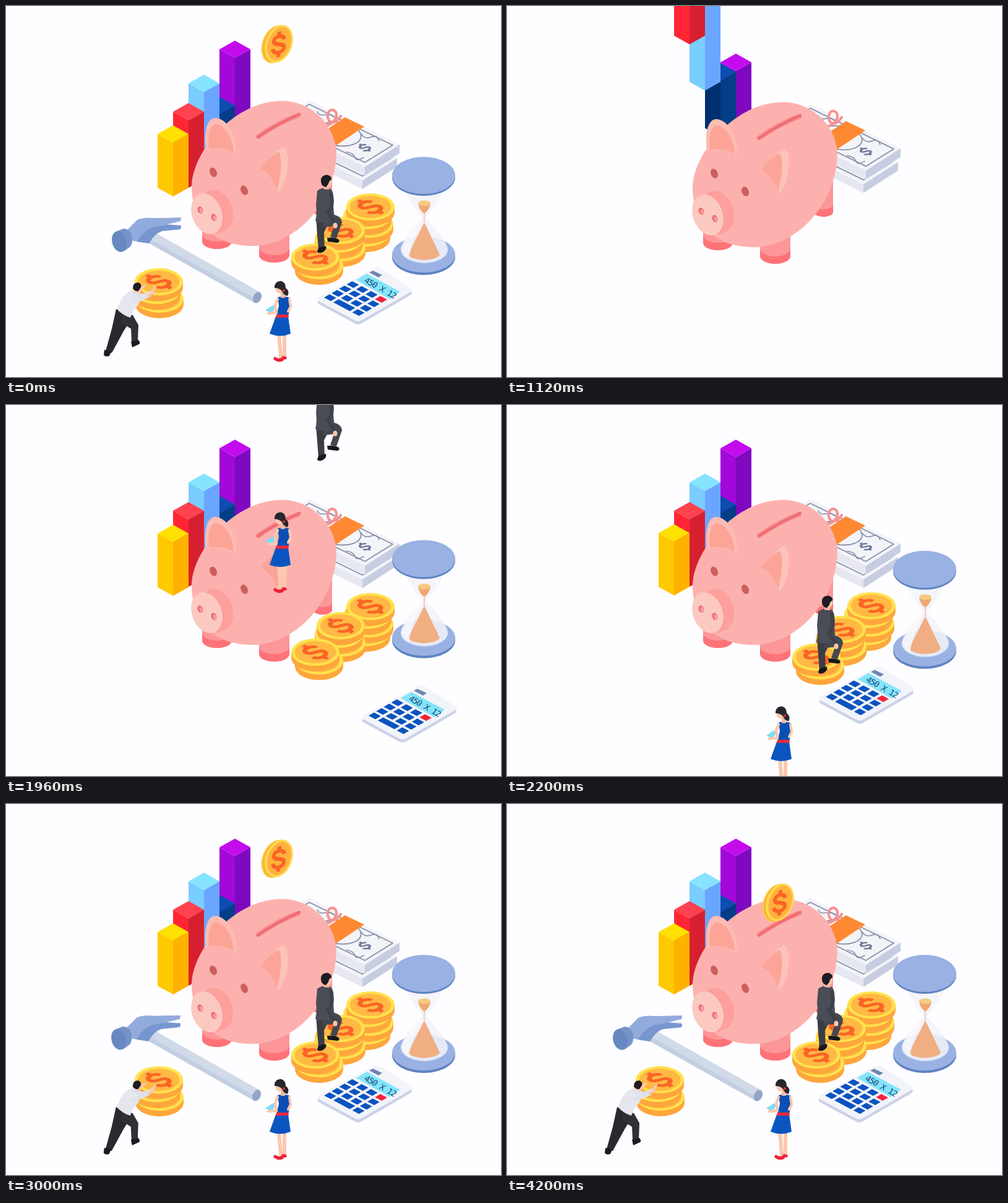
Animation of 800 by 600 pixels, one loop 4.68 s. Source, as an HTML page:

```html
<!DOCTYPE html>
<html lang="en">
<head>
<meta charset="utf-8">
<title>Savings</title>
<style>
html, body { margin: 0; width: 100%; height: 100%; overflow: hidden; background: #fefdff }
svg { display: block; width: 100%; height: 100% }
</style>
</head>
<body>
<svg id="stage" viewBox="0 0 800 600"></svg>
<script>
const LOOP = 4680, START = 720;

// ---- shape helpers
const path = (d, fill, extra = '') => `<path d="${d}" fill="${fill}" ${extra}/>`;
const line = (d, color, width, cap = 'round') =>
  path(d, 'none', `stroke="${color}" stroke-width="${width}" stroke-linecap="${cap}" stroke-linejoin="round"`);
const poly = (points, fill) => `<polygon points="${points}" fill="${fill}"/>`;
const oval = (x, y, rx, ry, fill, turn = 0, extra = '') =>
  `<ellipse cx="${x}" cy="${y}" rx="${rx}" ry="${ry}" fill="${fill}" transform="rotate(${turn} ${x} ${y})" ${extra}/>`;

const dollar = (matrix, color, width) => `<g transform="matrix(${matrix})">` +
  line('M7 -5C6 -13 -8 -13 -7 -5C-6 1 7 -1 7 5.5C7 13 -7 13 -8 4.5M0 -17V-10M0 10V17', color, width, 'butt') + '</g>';

function bar(x, top, bottom, cap, left, right) {
  const m = x + 25, r = x + 50;
  return poly(`${x},${top + 14} ${m},${top + 28} ${m},${bottom} ${x},${bottom - 14}`, left) +
    poly(`${r},${top + 14} ${m},${top + 28} ${m},${bottom} ${r},${bottom - 14}`, right) +
    poly(`${x},${top + 14} ${m},${top} ${r},${top + 14} ${m},${top + 28}`, cap);
}

// Coins are listed by centre x, from the bottom up; y is the centre of the top face.
function stack(xs, y) {
  const coins = xs.map((x, i) => {
    const cy = y + (xs.length - 1 - i) * 14;
    return path(`M${x - 39} ${cy}v9a39 22 0 0 0 78 0v-9z`, '#fea63c') +
      oval(x, cy, 39, 22, '#ffe24c') + oval(x, cy, 33.5, 18, '#ffb944');
  });
  return coins.join('') + dollar(`1.15 -.64 1.15 .64 ${xs.at(-1)} ${y}`, '#fb6425', 4.8);
}

function leg(x, w, top, bottom) {
  const r = w / 2, ry = r * .5;
  const tube = (y, fill) => path(`M${x} ${y}V${bottom - ry}a${r} ${ry} 0 0 0 ${w} 0V${y}a${r} ${ry} 0 0 1 ${-w} 0z`, fill);
  return path(`M${x} ${top}h${w}V${bottom - ry}a${r} ${ry} 0 0 1 ${-w} 0z`, '#fc9698') +
    tube(bottom - ry - 12, '#fd7378');
}

// ---- objects
const pig = () =>
  line('M517 193C533 191 540 171 528 168C518 167 517 185 526 188C533 189 537 184 541 178', '#f98f90', 4) +
  leg(496, 31, 270, 339) + leg(317, 48, 345, 393) + leg(409, 49, 350, 415) +
  path('M300 290C301 240 364 154 446 153.5C490 153.5 530 188 534 235C534 315 470 388 398 388C335 388 300 350 300 290Z', '#fdb1ae') +
  line('M408 211Q440 188 472 177', '#fa8f90', 8) + line('M407 212Q440 190 474 175', '#ee6e74', 4.5) +
  path('M323 233C319 204 325 181 338 181C357 181 376 212 371 242C356 229 338 229 323 233Z', '#fcbcb3') +
  path('M328 231C325 206 331 190 340 191C356 194 368 216 368 238C355 229 340 229 328 231Z', '#fca597') +
  path('M411 263C425 245 440 232 446 229C455 228 457 245 455 262C453 282 446 296 440 301C437 285 425 270 411 263Z', '#fcc3b8') +
  path('M411 263C425 245 436 237 441 236C448 250 443 280 438 297C434 283 425 270 411 263Z', '#fca497') +
  oval(335, 269, 5.5, 8, '#cb5f5c', -25) + oval(385, 298, 5.5, 8, '#cb5f5c', -25) +
  oval(341, 331, 25, 34.5, '#fd9f9c', -20) + poly('315,305 331,299 358,361 340,369', '#fd9f9c') +
  oval(324.5, 336, 24, 34, '#fcc9c1', -20) +
  oval(314, 330, 4.2, 6, '#e9696b', -20) + oval(336, 342, 4.2, 6, '#e9696b', -20) +
  oval(315.3, 331, 2.6, 4.5, '#f99a98', -20) + oval(337.3, 343, 2.6, 4.5, '#f99a98', -20);

function bundle(dx, dy) {
  return `<g transform="translate(${dx} ${dy})">` +
    poly('434,188 580,260 580,274 434,202', '#e6e7f1') +
    poly('636,224 580,260 580,274 636,238', '#c7cde1') +
    poly('490,152 636,224 580,260 434,188', '#f3f4f8') +
    line('M490 159L625 225L580 253L445 187Z', '#8790aa', 1.8) + '</g>';
}
const money = () => bundle(-4, 22) + bundle(0, 0) +
  oval(538, 207, 36, 19, 'none', 8, 'stroke="#8790aa" stroke-width="1.8"') +
  line('M503 171Q506 178 515 176T529 179M574 207Q580 216 590 212T603 218M550 236Q562 238 564 245T578 245', '#8790aa', 1.6) +
  poly('548,180 579,195 522,233 492,217', '#ff8933') +
  dollar('.62 -.34 .5 .34 580 229', '#6f7a9a', 5);

const glass = () =>
  path('M624 402v4a51 29 0 0 0 102 0v-4z', '#5f83c2') + oval(675, 402, 51, 29, '#9ab2e3') +
  oval(676, 394, 38, 22, '#c9d5ef') +
  path('M638 394C640 376 664 354 673 344C668 333 652 325 648 302H704C700 325 684 333 679 344C688 354 712 376 714 394A38 21 0 0 1 638 394Z', '#f1f2f8', 'opacity=".75"') +
  path('M650 402L674 354Q676 350 678 354L701 402A26 11 0 0 1 650 402Z', '#f0ae82') +
  path('M666 320Q668 330 676 336Q684 330 686 320Z', '#f0a873') + oval(676, 319, 10, 4.5, '#f4cb80') +
  line('M676 334V352', '#f0ae82', 1) +
  path('M640 393C643 376 662 358 671 347C662 366 654 385 652 409Q643 405 640 393Z', '#fff', 'opacity=".55"') +
  line('M652 309Q657 327 671 340M699 309Q694 327 681 340', '#fff', 1.4) +
  path('M624 273v4a51 30 0 0 0 102 0v-4z', '#5f83c2') + oval(675, 274, 51, 30, '#99b1e3');

function calculator() {
  const spot = (i, j) => [560.5 + 15.2 * i - 12.2 * j, 450.5 + 8 * i + 7.1 * j];
  const key = (i, j, a, fill) =>
    poly([[-a, -.36], [a, -.36], [a, .36], [-a, .36]].map(([u, v]) => spot(i + u, j + v)).join(' '), fill);
  let keys = '';
  for (let i = 0; i < 4; i++) for (let j = 0; j < 4; j++) {
    const wide = j == 3 && i == 1;
    if (j == 3 && i == 2) continue;
    keys += key(wide ? 1.5 : i, j, wide ? .88 : .36, i == 3 && j == 0 ? '#f5243a' : '#0b53c0');
  }
  const shell = 'M507 470L595 424Q600 421 606 425L653 455Q659 459 653 463L575 508Q569 512 563 508L507 478Q500 474 507 470Z';
  return path(shell, '#cbd2e5', 'transform="translate(0 5)"') + path(shell, '#f2f4fa') +
    poly('587,431 593,428 608,435 602,439', '#6d87b0') +
    poly('566,443 583,433 637,462 620,474', '#83e5fa') +
    `<text transform="matrix(.86 .48 -.55 .76 577.5 446)" font-family="'DejaVu Sans Mono', monospace" font-size="14" letter-spacing="-1.3" fill="#1c4379">450 X 12</text>` + keys;
}

const hammer = () =>
  poly('240,366 411,463 402,480 230,383', '#d1dae8') + poly('230,383 234,377 405,474 402,480', '#c3cfe0') +
  oval(406, 471.5, 6.5, 9.5, '#93a6c8', 25) +
  path('M196 362L212 346Q222 341 240 343L283 342L282 348L261 353L283 355L282 361L252 364Q240 368 231 384L212 381L202 379Z', '#92abdd') +
  path('M231 384Q240 368 252 364L282 361L283 355L261 354L240 357Q222 362 212 381Z', '#7796cf') +
  path('M177 365L190 360Q202 361 204 374Q205 385 200 390L190 397Z', '#7593c9') +
  oval(183, 381, 11.5, 17, '#6788c0', -15);

const climber = () =>
  path('M501 342L526 342L514 366L515 394L505 394Z', '#3b3d45') +
  path('M512 336Q542 335 543 350L534 376L524 374L530 356L512 358Z', '#454750') +
  path('M519 375Q528 374 537 377Q541 382 535 383L520 381ZM505 391L517 388Q519 394 512 398Q504 401 503 397Z', '#17171c') +
  path('M503 299Q513 291 525 296Q531 302 529 323L531 346Q520 354 500 348Q503 335 501 322Z', '#4a4c56') +
  line('M525 303Q530 327 520 333L531 350', '#3f414a', 6) + oval(532, 355, 3.5, 4.5, '#f9c6ad') +
  path('M513 286L523 287L522 297L513 296Z', '#f4b99d') + oval(519.5, 285, 6.5, 8, '#f9c6ad') +
  path('M509 284Q508 274 519 273Q527 275 526 281Q522 282 521 288L517 293Q510 292 509 284Z', '#1d1c22');

const reader = () =>
  line('M441 530L444 567M450 530L450 565', '#fbc8ae', 6) +
  path('M434 567Q443 573 447 567L449 573Q441 579 432 571ZM446 566L453 567L454 571L447 572Z', '#ee2238') +
  path('M436 502H456L460 530Q443 537 426 530Z', '#0b55c0') +
  path('M439 471Q449 468 459 472L460 486L456 502H437L441 485Z', '#0a4fb4') + poly('437,499 456,499 457,504 436,504', '#f0283c') +
  poly('419,492 431,484 436,487 429,497', '#7fdcf4') +
  line('M439 474L435 484L437 496L424 497', '#fbc8ae', 4.5) + line('M458 474L460 486L456 494', '#fbc8ae', 4) +
  path('M444 463H451V472H444Z', '#f3b89d') + oval(442, 457, 6.5, 8, '#fbc8ae') +
  path('M434 453Q436 444 445 445Q452 447 452 456Q459 461 455 469Q449 468 446 461Q442 456 434 456Z', '#28262d') +
  oval(449, 460, 2, 2, '#e62e40');

const pusher = () =>
  path('M178 490L205 502L190 526L171 561L161 558L171 522Z', '#29292f') +
  path('M188 497L205 500L214 516L213 543L203 543L202 522L186 512Z', '#303037') +
  path('M159 556L170 559L167 566Q160 568 158 564ZM202 543L214 540Q218 545 215 547L204 552Z', '#1b1b20') +
  path('M184 479Q194 459 209 459L219 465Q217 484 206 491L201 504Q188 500 179 490Z', '#e5e6ee') +
  line('M207 464Q217 473 236 463M206 478Q219 474 231 468', '#e0e2ea', 6) +
  line('M236 463L241 455M230 468L239 464M218 458L224 452', '#f9c6ad', 4) +
  oval(213, 457, 6.5, 7, '#f9c6ad') +
  path('M205 456Q205 448 213 447Q220 449 218 455L214 461Q207 462 205 456Z', '#1d1c22');

const token = () =>
  oval(435, 62, 21, 31.5, '#ffcf48', 20) + oval(437, 61.5, 21, 31.5, '#fbb638', 20) +
  oval(441, 61, 21.5, 31.5, '#ffd951', 20) + oval(441.5, 61, 18, 28, '#ffb23e', 20) +
  dollar('1.2 -.3 -.05 1.2 441 62', '#fb6425', 5);

// ---- parts, back to front: drawing, landing time, speed in px/ms, direction
const parts = [
  [bar(345, 56, 252, '#c40bee', '#a108d9', '#7e09bf'), 1077, .8],
  [bar(320, 147, 266, '#0b4db0', '#00306f', '#043d88'), 1188, .8],
  [bar(295, 111, 280, '#86e4ff', '#7acdff', '#6aa6ff'), 1299, .8],
  [bar(270, 157, 294, '#ff4150', '#ff2535', '#d7202f'), 1410, .8],
  [bar(245, 193, 308, '#ffe000', '#ffc900', '#fdb200'), 1521, .8],
  [money(), 965, 1.3],
  [pig(), 950, 1.8],
  [stack([582, 587, 584, 589], 325), 1592, 1.7],
  [stack([542, 538, 541], 363), 1672, 1.7],
  [stack([506, 500], 406), 1762, 1.7],
  [glass(), 1977, 1.5],
  [calculator(), 2020, 1.2, [-1, -.43]],
  [climber(), 2166, 1.5],
  [reader(), 2141, 1.5],
  [stack([248, 243, 247], 446), 2485, 2],
  [pusher(), 2455, 1.6, [1, -.45]],
  [hammer(), 2512, 2.4, [-1, -.34]]
];
const stage = document.getElementById('stage');
stage.innerHTML = parts.map(p => `<g>${p[0]}</g>`).join('') + `<g>${token()}</g>`;
const nodes = [...stage.children], coin = nodes.at(-1);

// Straight flight, then a damped swing around the resting place.
const swing = (t, speed) =>
  speed * (t < 0 ? t : 56 * Math.exp(-.0092 * t) * Math.sin(Math.PI * t / 175));
const clamp = x => Math.min(1, Math.max(0, x));

function draw(t) {
  const intro = t >= START;
  parts.forEach(([, land, speed, [dx, dy] = [0, 1]], i) => {
    const d = intro ? swing(t - land, speed) : 0;
    nodes[i].setAttribute('transform', `translate(${d * dx} ${d * dy})`);
  });
  const drop = 49 * (1 - Math.cos(Math.PI * clamp((t - 2480) / 1480)));
  coin.setAttribute('transform', `translate(0 ${intro ? drop : 0})`);
  coin.setAttribute('opacity', intro ? clamp((t - 2640) / 260) : 1);
}

const begin = performance.now();
function tick() {
  const t = (performance.now() - begin) % LOOP;
  draw(t - t % 40);
  requestAnimationFrame(tick);
}
tick();
</script>
</body>
</html>
```
